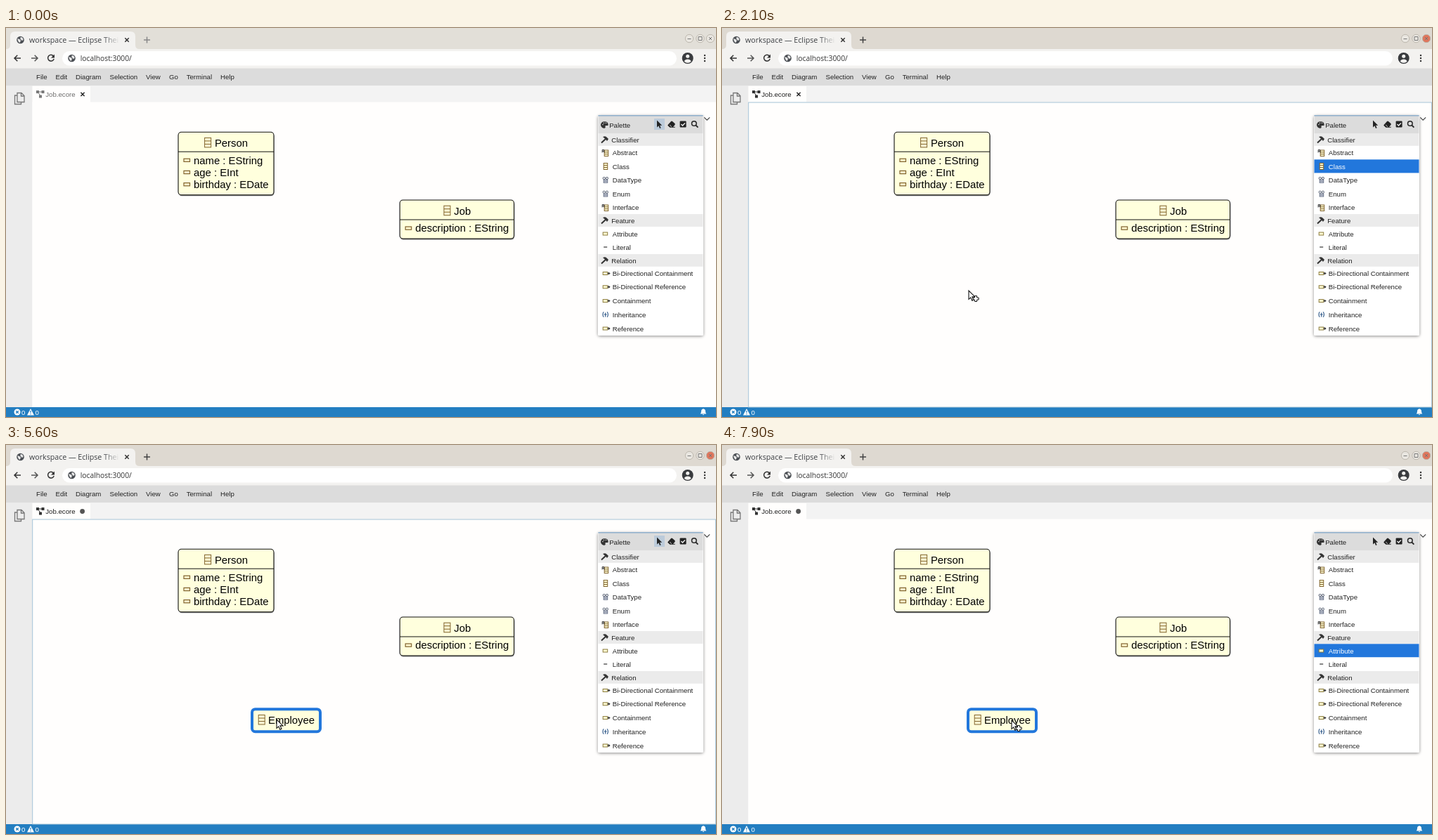
Animation, 1010 px wide and 554 px high, one loop 8 s. Source, as an HTML page:

```html
<!DOCTYPE html>
<html lang="en">
<head>
<meta charset="utf-8">
<title>Diagram editor</title>
<style>
html, body { margin: 0; width: 100%; height: 100%; overflow: hidden; background: #fffefd; }
svg { display: block; font: 9.65px "Liberation Sans", Arial, sans-serif; }
text { white-space: pre; }
.ui { font-family: "Open Sans", "Noto Sans", sans-serif; }
.node { font-size: 14.86px; }
</style>
</head>
<body>
<svg id="stage" width="1010" height="554" viewBox="0 0 1010 554"></svg>
<script>
const BLUE = '#2277dc', CREAM = '#ffffdd', BROWN = '#80632f', DARK = '#333';

const rect = (x, y, w, h, fill, more = '') =>
  `<rect x="${x}" y="${y}" width="${w}" height="${h}" fill="${fill}" ${more}/>`;
const circle = (x, y, r, fill, more = '') =>
  `<circle cx="${x}" cy="${y}" r="${r}" fill="${fill}" ${more}/>`;
const line = (d, stroke, width = 1, fill = 'none', more = '') =>
  `<path d="${d}" stroke="${stroke}" stroke-width="${width}" fill="${fill}" ${more}/>`;
const shape = (d, fill, more = '') => `<path d="${d}" fill="${fill}" ${more}/>`;
const text = (x, y, s, fill = '#222', more = '') =>
  `<text x="${x}" y="${y}" fill="${fill}" ${more}>${s}</text>`;
const group = (id, body, more = '') => `<g id="${id}" ${more}>${body}</g>`;
const at = (x, y, body) => `<g transform="translate(${x} ${y})">${body}</g>`;

const cross = (x, y, r, color, width) =>
  line(`M${x - r} ${y - r}l${2 * r} ${2 * r}m0 ${-2 * r}l${-2 * r} ${2 * r}`, color, width);

const globe = (x, y) => at(x, y, circle(0, 0, 5.3, '#4b4f54') +
  shape('M-4 -2Q-1 -1 0 0T-1 4Q-4 2 -4 -2ZM0 -4Q4 -4 4 0L2 1Q1 -1 0 -1Z', '#e8e8e8'));

// Diagram icons
const classIcon = (x, y, w = 9, h = 13.5) => rect(x, y, w, h, '#fffbd2', `stroke="${BROWN}"`) +
  line(`M${x} ${y + h / 3}h${w}m0 ${h / 3}h${-w}`, BROWN);
const attrIcon = (x, y) => rect(x, y, 8.5, 4.2, '#fff6cd', `stroke="${BROWN}" stroke-width="1.2"`);

const node = (x, y, w, h, title, iconX, attrs) =>
  rect(x + .5, y + 1.5, w, h, '#777', 'rx="4.5"') +
  rect(x, y, w, h, CREAM, 'rx="4.5" stroke="#111" stroke-width="1.1"') +
  line(`M${x} ${y + 28}h${w}`, '#111') +
  classIcon(iconX, y + 8.2) + text(iconX + 14.3, y + 20.6, title, '#000') +
  attrs.map((a, i) => attrIcon(x + 8, y + 38 + 17.2 * i) +
    text(x + 22, y + 45.4 + 17.2 * i, a, '#000')).join('');

const browser = () =>
  rect(0, 0, 1010, 31, '#e0dcd4', 'id="titlebar"') +
  shape('M0 30Q6 30 6 24V12Q6 5 13 5H177Q184 5 184 12V24Q184 30 190 30Z', '#f3f2f0') +
  rect(0, 30, 1010, 28, '#f3f2f0') +
  globe(20.5, 17) + text(33, 20.5, 'workspace — Eclipse Thei', '#3c3f43', 'class="ui" font-size="10.65"') +
  rect(138, 8, 25, 18, 'url(#fade)') + cross(172, 17, 2.7, '#333', 1.5) +
  line('M196 17h9M200.5 12.5v9', '#888', 1.5, 'none', 'id="plus"') +
  [972, 987.5, 1002].map((x, i) =>
    circle(x, 15, 5.7, '#e9e6e0', `stroke="#b9b4aa" stroke-width=".9" id="win${i}"`)).join('') +
  line('M969.5 15.5h5M985 12.5h5v5h-5z', '#777') + cross(1002, 15, 2, '#777', 1) +
  line('M21 43H12m4.3-4.3L12 43l4.3 4.3', '#333', 1.5) +
  line('M36 43h9m-4.3-4.3L45 43l-4.3 4.3', '#555', 1.5) +
  line('M67.5 40A4.4 4.4 0 1 0 68.2 44', '#333', 1.5) + shape('M69 37.5V42.5H64Z', '#333') +
  rect(80, 33, 874, 20.5, '#fff', 'rx="10.2"') + globe(93.5, 43) +
  text(105.7, 46.6, 'localhost:3000/', '#333', 'class="ui" font-size="10.3"') +
  circle(969.7, 43, 8, '#393b3e') + circle(969.7, 40.3, 2.5, '#f3f2f0') +
  shape('M964.7 47.6Q966 44.5 969.7 44.5T974.7 47.6Q969.7 52 964.7 47.6', '#f3f2f0') +
  [39, 43, 47].map(y => circle(994, y, 1.2, '#333')).join('');

const workbench = () => {
  const menu = { File: 43, Edit: 70.5, Diagram: 99, Selection: 147.5, View: 199, Go: 232, Terminal: 256.7, Help: 305 };
  return rect(0, 57.5, 1010, 25, '#dcdcdc') +
    Object.entries(menu).map(([s, x]) => text(x, 73.2, s)).join('') +
    rect(0, 82, 1010, 24, '#f3f3f3') + rect(0, 82, 37.5, 458, '#ececec') +
    line('M15.5 96H12.5V108.5H21.5V106M16 92.5h6l4 4v9H16zM21.5 92.5v4.5H26', '#777', 1.3) +
    rect(37.5, 83, 82.5, 24, '#fffefd') + rect(37.5, 105.5, 972.5, 435, '#fffefd') +
    group('tab', shape('M43 89h4v4h-4zM50.5 89h4v4h-4zM47 95.5h4v4h-4z', DARK) +
      line('M46 91h5M46 92l3 5', DARK) + text(56.3, 97.6, 'Job.ecore', '#222')) +
    group('tabClose', cross(109, 94.3, 2.6, '#222', 1.4)) +
    circle(108.6, 94.5, 3.4, '#555', 'id="dirty"') +
    rect(0, 540, 1010, 14, '#237ec1') +
    circle(16, 547, 4.5, '#fff') + cross(16, 547, 1.8, '#237ec1', 1.3) +
    text(22, 550.6, '0', '#fff') + shape('M35 542L40 551.5H30Z', '#fff') +
    line('M35 545v3M35 549v1.3', '#237ec1', 1.2) + text(41.5, 550.6, '0', '#fff') +
    shape('M987.7 549.5Q989 548 989 546Q989 543 992 542.3Q995 543 995 546Q995 548 996.3 549.5ZM990.7 550.2h2.6q-1.3 2-2.6 0', '#fff');
};

// Palette rows: label, centre line, icon kind
const rows = [
  ['Classifier', 159, 'head'], ['Abstract', 177.5, 'tagged'], ['Class', 197, 'class'],
  ['DataType', 216.3, 'type'], ['Enum', 236, 'type'], ['Interface', 255.5, 'tagged'],
  ['Feature', 274, 'head'], ['Attribute', 293, 'attr'], ['Literal', 312, 'dash'],
  ['Relation', 331, 'head'], ['Bi-Directional Containment', 349.5, 'rel'],
  ['Bi-Directional Reference', 368.8, 'rel'], ['Containment', 388.6, 'rel'],
  ['Inheritance', 408, 'inherit'], ['Reference', 428, 'rel']];

const smallClass = classIcon(-2.5, -4.5, 5.5, 9);
const smallRect = rect(-3.5, -2, 6.5, 4, '#fffbd2', 'stroke="#8a7b3e"');
const icons = {
  head: line('M-5 4.5L2 -2', DARK, 2) + shape('M-3 -4Q1 -6 3 -3L5 -1L3 2L1 -.5Z', DARK),
  tagged: classIcon(-1.5, -3.5, 5.5, 8.5) + line('M-4.5 0V-4H-2V0M-4.5 -2H-2', DARK),
  class: smallClass,
  type: circle(-2, -2.3, 1.6, 'none', 'stroke="#555e70"') + circle(2.2, -2.3, 1.6, 'none', 'stroke="#555e70"') +
    rect(-2.5, 0, 5.5, 4, '#dfe3ec', 'stroke="#667086"') + line('M-2 2h4.5', '#667086'),
  attr: smallRect,
  dash: line('M-2.5 0h5', DARK, 1.2),
  rel: smallRect + line('M3 0h3', DARK) + shape('M4 -2.2L7 0L4 2.2Z', DARK),
  inherit: line('M-2.5 -3.8Q-5 0 -2.5 3.8M2.5 -3.8Q5 0 2.5 3.8M0 -2.5V3.5M-2 0h4', '#2c5687', 1.1)
};

const palette = () =>
  rect(842, 124.5, 150, 313.5, '#fff', 'rx="3" filter="url(#shadow)"') +
  rect(842.5, 124, 149, 26, '#dcdcdc') + rect(842.5, 124, 149, 1.5, '#8fb0cd') +
  shape('M851.5 133.2a4.8 4.8 0 1 0 .5 9.4q1.2-.6 .5-2t1-1.6h2q1.5 0 1.2-1.6a5 5 0 0 0-5.2-4.2', DARK) +
  [[849, 137.5], [850.5, 135.3], [853.5, 135.3]].map(([x, y]) => circle(x, y, .8, '#dcdcdc')).join('') +
  text(858.2, 141.6, 'Palette') +
  rect(922, 129, 15, 16, '#bccbda', 'id="pointerTool"') +
  shape('M926 131.5V141.5L928.4 139.3L930 143L931.6 142.2L930 138.8H933.2Z', '#222') +
  shape('M941.5 138L946 133Q947 132 948 133L951.5 136Q952 137 951.5 138L949 140.7H951.7V141.8H944.5L941.7 139.3Q941 138.6 941.5 138', '#222') +
  line('M944.2 138L946.8 140.6', '#dcdcdc') +
  rect(958.6, 132.5, 9, 9, '#222', 'rx="1"') + line('M960.5 137l2 2 3.4-3.6', '#fff', 1.3) +
  circle(978.8, 136, 3.3, 'none', 'stroke="#222" stroke-width="1.5"') + line('M981.2 138.4l3.2 3.2', '#222', 1.8) +
  line('M993.3 127.3l3.9 3.9 3.9-3.9', '#444', 1.2) +
  rows.map(([s, y, kind]) => {
    const head = kind === 'head';
    return rect(842.5, y - (head ? 9 : 9.7), 149, head ? 18 : 19.4, head ? '#ebebeb' : '#fff', `id="row${s}"`) +
      at(head ? 852 : 852.7, y, icons[kind]) +
      text(head ? 861.2 : 862.8, y + 3.5, s, '#222', `id="label${s}"`);
  }).join('');

const ARROW = 'M0 0V12.3L2.8 9.8L4.8 14.2L7 13.2L5 8.9H9Z';
const PLUS = 'M8.6 7.5h3v2.5h2.5v3h-2.5v2.5h-3v-2.5h-2.5v-3h2.5z';
const IBEAM = 'M-2.5 -6.5Q0 -6.5 0 -5V5Q0 6.5 -2.5 6.5M2.5 -6.5Q0 -6.5 0 -5M0 5Q0 6.5 2.5 6.5';

const stage = document.getElementById('stage');
stage.innerHTML =
  `<defs>
    <linearGradient id="fade"><stop stop-color="#f3f2f0" stop-opacity="0"/><stop offset=".95" stop-color="#f3f2f0"/></linearGradient>
    <filter id="shadow" x="-10%" y="-10%" width="120%" height="120%"><feDropShadow dx="0" dy="1" stdDeviation="2" flood-opacity=".45"/></filter>
  </defs>` +
  browser() + workbench() +
  group('nodes', node(245, 148.2, 136, 89.5, 'Person', 282.6, ['name : EString', 'age : EInt', 'birthday : EDate']) +
    node(560.2, 245, 162.5, 55, 'Job', 623, ['description : EString']), 'class="node"') +
  group('created', rect(350, 376.2, 116, 32, CREAM, `id="box" rx="4.5" stroke="${BLUE}" stroke-width="4"`) +
    classIcon(359.2, 384.5) +
    group('field', rect(373.5, 384, 88, 16.5, '#fffff0') + line('M373.8 384v16', '#d6d6c0', 1)) +
    rect(375.5, 383.5, 85.5, 17.5, '#a8cdf5', 'id="selection"') +
    text(373, 397.3, '', '#000', 'id="name"') + rect(0, 385, 1, 15, '#222', 'id="caret"'), 'class="node"') +
  rect(37.7, 106, 971.8, 434, 'none', 'id="focus" stroke="#a3c3d6"') +
  palette() +
  group('pointer', shape(ARROW, '#fff', 'id="arrow" stroke="#111" stroke-width="1.1"') +
    shape(PLUS, '#fff', 'id="add" stroke="#111"') +
    group('ibeam', line(IBEAM, '#fff', 2.6) + line(IBEAM, '#111', 1.3), 'transform="translate(2.3 3)"'));

const el = {};
stage.querySelectorAll('[id]').forEach(e => el[e.id] = e);
const show = (id, on) => el[id].style.display = on ? '' : 'none';
const paint = (id, fill) => el[id].setAttribute('fill', fill);

// Pointer track: time, x, y
const track = [
  [0, 950, 202], [1300, 950, 202], [1400, 930, 225], [1500, 845, 298], [1600, 705, 360],
  [1700, 520, 387], [1800, 400, 384], [1900, 351, 374], [2400, 351, 374], [2700, 372, 387],
  [3000, 385, 391], [5700, 385, 391], [5800, 392, 398], [5900, 425, 406], [6000, 480, 400],
  [6300, 651, 353], [6500, 770, 314], [6600, 836, 296], [6700, 860, 294], [7200, 860, 294],
  [7300, 840, 300], [7500, 680, 350], [7700, 500, 388], [7800, 440, 392], [7900, 412, 392], [8000, 412, 392]];

function pointerAt(t) {
  const i = track.findIndex(p => p[0] > t);
  const [a, b] = [track[i - 1], track[i]], k = (t - a[0]) / (b[0] - a[0]);
  return [a[1] + (b[1] - a[1]) * k, a[2] + (b[2] - a[2]) * k];
}

const keyTimes = [4100, 4300, 4500, 4700, 4800, 5100, 5200, 5300];

function draw(t) {
  const between = (a, b) => t >= a && t < b;
  const active = t >= 800, dirty = t >= 2300;
  const editing = between(3300, 5600), typing = between(4100, 5600), ibeam = between(3500, 5600);
  const tool = between(900, 2300) ? 'Class' : t >= 7000 ? 'Attribute' : '';
  const hover = between(400, 1200) ? 'Class' : between(1200, 1300) ? 'DataType'
    : between(1300, 1400) ? 'Enum' : between(6700, 7000) ? 'Attribute' : '';

  paint('titlebar', active ? '#ded9d1' : '#e2dfd8');
  paint('win2', active ? '#e0765c' : '#e9e6e0');
  el.plus.setAttribute('stroke', active ? '#444' : '#888');
  el.tab.setAttribute('opacity', active ? 1 : .65);
  show('tabClose', !dirty);
  show('dirty', dirty);
  show('focus', between(2100, 3300) || between(5600, 7000));
  show('pointerTool', !tool);
  for (const [s, , kind] of rows) {
    if (kind === 'head') continue;
    paint('row' + s, s === tool ? BLUE : s === hover ? '#e8e8e8' : '#fff');
    paint('label' + s, s === tool ? '#fff' : '#222');
  }

  show('created', dirty);
  show('field', editing);
  show('selection', between(3300, 4100));
  show('caret', typing);
  el.box.setAttribute('width', t < 5600 ? 116 : 97);
  el.name.textContent = t < 4100 ? 'NewEClass2' : 'Employee'.slice(0, keyTimes.filter(k => k <= t).length);
  el.name.setAttribute('x', editing ? 375.7 : 373);
  if (typing) el.caret.setAttribute('x', 375.7 + el.name.getComputedTextLength());

  const [x, y] = pointerAt(t);
  show('pointer', t >= 500);
  show('arrow', !ibeam);
  show('ibeam', ibeam);
  show('add', tool && x < 842);
  el.pointer.setAttribute('transform', `translate(${x} ${y})`);
}

const start = performance.now();
function tick() {
  const t = (performance.now() - start) % 8000;
  draw(Math.floor(t / 100) * 100);
  requestAnimationFrame(tick);
}
tick();
</script>
</body>
</html>
```
